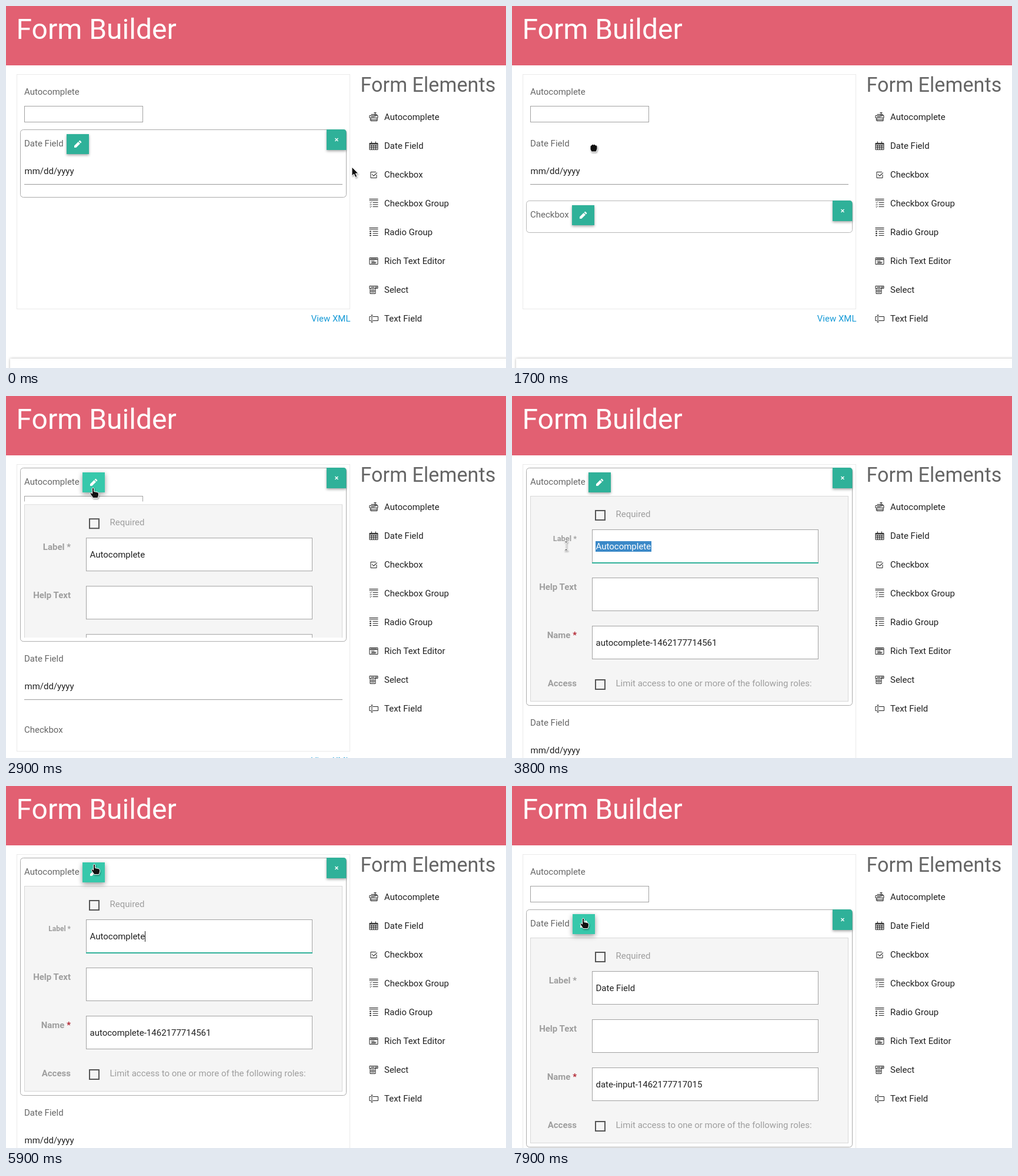
An HTML page for the animation above (8000 ms loop, 850 by 616 pixels).

```html
<!DOCTYPE html>
<html lang="en">
<head>
<meta charset="utf-8">
<title>Form Builder</title>
<style>
html, body { margin: 0; width: 100%; height: 100%; overflow: hidden; background: #fff; }
#stage { display: block; width: 850px; height: 616px; font: 15px Roboto, Arial, sans-serif; fill: #212121; }
.line { fill: none; stroke: #222; }
.box { fill: #fff; stroke: #a2a2a2; }
.tick { fill: none; stroke: #555; stroke-width: 2; }
.name { fill: #666; }
.hint { fill: #9e9e9e; }
.key { fill: #9e9e9e; font-weight: 700; text-anchor: end; }
.raised { filter: drop-shadow(0 2px 2px rgba(0,0,0,.35)); }
.lifted { filter: drop-shadow(0 3px 4px rgba(0,0,0,.4)); }
.footer { fill: #fff; filter: drop-shadow(0 0 2px rgba(0,0,0,.3)); }
.cursor { fill: #111; stroke: #fff; stroke-linejoin: round; filter: drop-shadow(1px 2px 1px rgba(0,0,0,.3)); }
</style>
</head>
<body>
<svg id="stage" viewBox="0 0 850 616">
  <g id="form"></g>
  <rect width="850" height="101" fill="#e26072"/>
  <text x="17.5" y="56" font-size="48" fill="#fff">Form Builder</text>
  <text x="602.5" y="146" font-size="34.2" class="name">Form Elements</text>
  <g id="list"></g>
  <g id="pointer"></g>
</svg>
<script>
const LOOP = 8000, GREEN = [47, 177, 153], BRIGHT = [55, 200, 171];
const $ = id => document.getElementById(id);
const clamp = v => Math.max(0, Math.min(1, v));
const lerp = (a, b, k) => a + (b - a) * k;
const swing = k => .5 - Math.cos(Math.PI * clamp(k)) / 2;
const within = (t, a, b) => t >= a && t < b;

const text = (x, y, s, more = '') => `<text x="${x}" y="${y}" ${more}>${s}</text>`;
const rect = (x, y, w, h, more = '') => `<rect x="${x}" y="${y}" width="${w}" height="${h}" ${more}/>`;
const path = (d, more = '') => `<path d="${d}" ${more}/>`;
const at = (x, y, s) => `<g transform="translate(${x} ${y})">${s}</g>`;

// Palette of form elements: name and 16px icon
const elements = [
  ['Autocomplete', 'M.5 5.5h14v4H.5zM2.5 9.5v5h11v-5M1 12.5h13M3 7.5h6M8 .5h4M10 .5v7M3 3.5h10v2'],
  ['Date Field', 'M.5 3.5h14v11H.5zM.5 4.5h14M.5 6.5h14M.5 9h14M.5 11.5h14M4 6v8M7.5 6v8M11 6v8M4 .5v4M11 .5v4'],
  ['Checkbox', 'M12.5 8v5.5h-10v-10h9M4.500 7l3 3 6-5.500M5 7.5l2.500 3 5-5'],
  ['Checkbox Group', 'M0 .5h15M0 3h15M6 6.5h9M6 10h9M6 13.5h9M1 6.500l1 1 2-2M1 10l1 1 2-2M1 13.500l1 1 2-2'],
  ['Radio Group', 'M0 .5h15M0 3h15M6 6.5h9M6 10h9M6 13.5h9M1 6h2v1H1zM1 9.500h2v1H1zM1 13h2v1H1z'],
  ['Rich Text Editor', 'M.5 2.5h14v11H.5zM.5 5.500h14M2 4h11M3 8h6M4 10h8M3 11.500h8'],
  ['Select', 'M.5 1.5h14v4H.5zM1.5 5.5v9h9v-9M3 3.500h6M11 2.500v3M11 3.500h3M3 8h6M1.500 10h9M3 12h6'],
  ['Text Field', 'M3 4.5H.5v7H3M6 4.5h9v7H6M4.5 2v12M3 2h3M3 14h3']
];
const element = ([name, icon]) => path(icon, 'class="line"') + text(25.5, 13, name);
$('list').innerHTML = elements.map((e, i) => at(617.5, 181 + 49 * i, element(e))).join('');

// Pointer: [time, x, y] stops and [time, shape] switches
const stops = [
  [0, 588, 274], [100, 588, 274], [400, 640, 287], [550, 645, 288], [1150, 120, 350], [1350, 120, 350],
  [1600, 139, 241], [1750, 139, 241], [2250, 148, 156], [3000, 148, 156], [3600, 92, 255], [3850, 92, 255],
  [4300, 250, 260], [4750, 250, 260], [5400, 150, 133], [6330, 150, 133], [6620, 116, 225], [6800, 117, 225],
  [7050, 121, 225], [LOOP, 121, 225]
];
const shapes = [[0, 'arrow'], [250, 'hand'], [500, 'fist'], [2000, 'hand'], [3200, 'arrow'], [3450, 'beam'], [5200, 'hand']];
const cursors = {
  arrow: 'M0 0V15l3.500-3 2.500 5.500 2.800-1.300L6.300 11H11z',
  hand: 'M-1.500 1Q0-1 1.500 1V6.500L7 7.500Q9.500 8 9.500 10.500V13L8 17.500H0L-4.500 11Q-5.500 9-3.500 8.500L-1.500 10z',
  fist: 'M-6-2Q-6-4-4-4Q-3-7-.5-5Q2-7 3-4Q6-5 6-2V2L4 7H-4L-6 3z',
  beam: 'M-3-8H-1L0-7.500 1-8H3V-7L.7-6V6L3 7V8H1L0 7.500-1 8H-3V7L-.7 6V-6L-3-7z'
};

function place(t) {
  const i = stops.findIndex(s => s[0] > t);
  const [a, x, y] = stops[i - 1], [b, u, v] = stops[i];
  const k = swing((t - a) / (b - a));
  return [lerp(x, u, k), lerp(y, v, k)];
}

function pointer(t) {
  const [x, y] = place(t);
  const shape = shapes.filter(s => s[0] <= t).pop()[1];
  const held = within(t, 550, 1350) ? at(x - 28, y - 10, element(elements[2])) : '';
  return held + at(x, y, path(cursors[shape], 'class="cursor"'));
}

// Hover strength: quick rise after a, fade out after b
const hover = (t, a, b) => Math.min(clamp((t - a) / 300), clamp(1 - (t - b) / 300));

function frame(y, h, penX, glow, pen) {
  const rgb = GREEN.map((c, i) => Math.round(lerp(c, BRIGHT[i], pen)));
  let s = rect(24.5, y + .5, 554, h - 1, `rx="5" fill="none" stroke="#aaa" opacity="${glow}"`);
  if (glow < .3) return s;
  s += `<g class="${pen > .5 ? 'lifted' : 'raised'}">${rect(penX, y + 8, 38, 34, `fill="rgb(${rgb})"`)}</g>`;
  s += at(penX + 19, y + 25, path('M-6 6V2.800L.8-4 4-.8-2.800 6zM1.600-4.800l1-1q.9-.7 1.700.1l1.600 1.600q.8.8 0 1.700l-1 .9z', 'fill="#fff"'));
  s += `<g class="raised">${path(`M545 ${y}h28.500q5 0 5 5v30h-33.500z`, 'fill="#2fb199"')}</g>`;
  return s + path(`M559.500 ${y + 15}l5 5m0-5l-5 5`, 'stroke="#fff" stroke-width="1.400"');
}

// Settings panel, clipped to its current height
function panel(top, h, o) {
  const tick = y => rect(142, y, 16, 16, 'class="tick"');
  const field = y => rect(136.500, y + .5, 384, 56, 'class="box"');
  let s = rect(31.500, .5, 540, 349, 'fill="#f5f5f5" stroke="#d8d8d8"');
  s += tick(25) + text(176.500, 36, 'Required', 'class="hint"');
  s += text(110, lerp(78, 77, o.small), 'Label *', `class="key" font-size="${lerp(15, 12, o.small)}"`) + field(57);
  if (o.selected) s += rect(142, 77, 95, 18, 'fill="#3b89c8"');
  s += text(142.500, 91, o.label, o.selected ? 'fill="#fff"' : '');
  if (o.focus) s += rect(136, 113, 385, 2, 'fill="#2fb199"');
  if (o.caret) s += rect(236, 77, 1, 18);
  s += text(110, 160, 'Help Text', 'class="key"') + field(139);
  s += text(110, 242, 'Name <tspan fill="#b0202c">*</tspan>', 'class="key"') + field(221) + text(142.500, 255, o.name);
  s += text(110, 324, 'Access', 'class="key"') + tick(313);
  s += text(176.500, 324, 'Limit access to one or more of the following roles:', 'class="hint"');
  return `<svg x="0" y="${top}" width="600" height="${h}">${s}</svg>`;
}

// A field whose preview slides shut while its panel slides open by k
function slide(y, h, k, preview, size, gap, o) {
  let s = '';
  if (k < 1) s += `<svg x="0" y="${y + 48}" width="600" height="${size * (1 - k)}">${preview}</svg>`;
  const top = y + 48 + gap * (1 - k);
  if (k > 0) s += panel(top, Math.max(0, y + h - 7 - top), o);
  return s;
}

function form(t) {
  const openA = swing((t - 2780) / 200) - swing((t - 6200) / 200);
  const openD = swing((t - 7100) / 200);
  const hA = lerp(83, 405, openA), hD = lerp(116, 405, openD);
  const yA = 122, yD = yA + hA + 5, yC = yD + hD + 5;
  const dropped = t >= 1350;
  const bottom = Math.max(516, dropped ? yC + 61 : 0);
  const focus = t >= 3690;

  let s = rect(7, bottom + 84, 900, 300, 'class="footer"');
  s += rect(18.500, 116.500, 566, bottom - 117, 'fill="#fff" stroke="#eaeaea"');
  s += text(585.500, bottom + 21, 'View XML', 'text-anchor="end" fill="#189bd7"');

  s += text(31, yA + 29, 'Autocomplete', 'class="name"');
  s += slide(yA, hA, openA, rect(31.500, .5, 201, 27, 'class="box"'), 28, 42, {
    label: 'Autocomplete', name: 'autocomplete-1462177714561', focus,
    small: Math.sqrt(clamp((t - 3690) / 200)),
    selected: focus && t < 4500,
    caret: t >= 4500 && (t - 4500) % 1000 < 500
  });
  const penA = Math.max(hover(t, 2200, 3100), hover(t, 5250, 6350));
  s += frame(yA, hA, 130, hover(t, 1900, 6440), penA);

  s += text(31, yD + 29, 'Date Field', 'class="name"');
  const date = text(31.500, 28, 'mm/dd/yyyy') + path('M31 45.500h541', 'stroke="#999"');
  s += slide(yD, hD, openD, date, 60, 67, { label: 'Date Field', name: 'date-input-1462177717015', small: 0 });
  const glowD = t < 400 ? hover(t, -300, 50) : Math.max(hover(t, 1750, 1880), hover(t, 6450, LOOP));
  s += frame(yD, hD, 103, glowD, hover(t, 6600, LOOP));

  if (dropped) {
    s += text(31, yC + 29, 'Checkbox', 'class="name"');
    s += frame(yC, 55, 102, hover(t, 1250, 1650), 0);
  }
  return s;
}

function tick(now) {
  const t = now % LOOP;
  $('form').innerHTML = form(t);
  $('pointer').innerHTML = pointer(t);
  requestAnimationFrame(tick);
}
tick(0);
</script>
</body>
</html>
```
